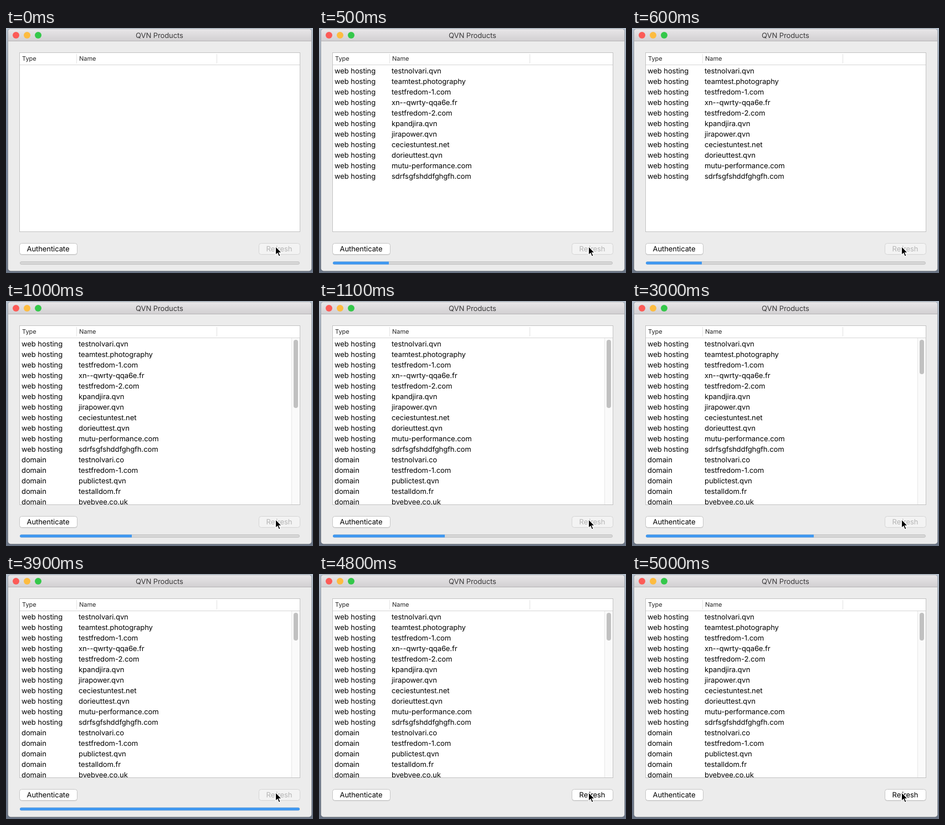
These frames come from a looping animation (554x442 px, 5.1 s). An HTML page:

```html
<!DOCTYPE html>
<html lang="en">
<head>
<meta charset="utf-8">
<title>Products</title>
<style>
  html, body { margin: 0; width: 100%; height: 100%; overflow: hidden; background: #8b97aa; }
  svg { display: block; width: 554px; height: 442px; }
  text { font: 13px Inter, "Open Sans", sans-serif; letter-spacing: -0.08px; fill: #000; text-rendering: geometricPrecision; }
  .head { font-size: 11px; letter-spacing: 0; fill: #262626; }
  .mid { text-anchor: middle; }
  .line { fill: none; }
</style>
</head>
<body>
<svg viewBox="0 0 554 442" xmlns="http://www.w3.org/2000/svg">
  <defs>
    <linearGradient id="desk" x2="0" y2="1">
      <stop offset="0" stop-color="#b4bfcc"/>
      <stop offset=".3" stop-color="#8593a8"/>
      <stop offset=".7" stop-color="#748197"/>
      <stop offset="1" stop-color="#6b7585"/>
    </linearGradient>
    <linearGradient id="bar" x2="0" y2="1">
      <stop offset="0" stop-color="#e8e6e8"/>
      <stop offset="1" stop-color="#d1cfd1"/>
    </linearGradient>
    <clipPath id="body"><rect x="25" y="67" width="505" height="300"/></clipPath>
    <clipPath id="track"><rect x="25" y="421.5" width="505" height="5" rx="2.5"/></clipPath>
  </defs>

  <rect width="554" height="442" fill="url(#desk)"/>
  <rect x="3.5" y="1.5" width="548" height="437" rx="5" fill="#ececec" stroke="#000" stroke-opacity=".2"/>
  <path d="M4 24V7a5 5 0 0 1 5-5H546a5 5 0 0 1 5 5V24Z" fill="url(#bar)"/>
  <path d="M4 23.5H551" stroke="#b6b4b6"/>
  <circle cx="18" cy="13" r="6" fill="#fc5b57"/>
  <circle cx="38" cy="13" r="6" fill="#fdbc40"/>
  <circle cx="58" cy="13" r="6" fill="#34c84a"/>
  <text class="mid" x="277" y="18" style="fill:#3a393a">QVN Products</text>

  <rect x="24.5" y="44.5" width="506" height="323" fill="#fff" stroke="#c2c2c2"/>
  <path class="line" d="M25 66.5H530" stroke="#d6d6d6"/>
  <path class="line" d="M127.5 47V64M380.5 47V64" stroke="#e2e2e2"/>
  <text class="head" x="29" y="59">Type</text>
  <text class="head" x="132" y="59">Name</text>
  <g id="rows" clip-path="url(#body)"></g>
  <g id="scroller">
    <rect x="515" y="67" width="15" height="300" fill="#fafafa"/>
    <path d="M515.5 67V367" stroke="#e7e7e7"/>
    <rect id="thumb" x="519" y="70" width="8" rx="4" fill="#c1c1c1"/>
  </g>

  <rect x="24.5" y="389" width="104" height="20.5" rx="4" fill="#aaa" opacity=".55"/>
  <rect x="24.5" y="388.5" width="104" height="20" rx="4" fill="#fff" stroke="#c6c6c6"/>
  <text class="mid" x="76" y="403">Authenticate</text>

  <rect id="edge" x="456.5" y="389" width="74" height="20.5" rx="4" fill="#aaa" opacity=".55"/>
  <rect id="button" x="456.5" y="388.5" width="74" height="20" rx="4"/>
  <text id="label" class="mid" x="493" y="403">Refresh</text>

  <g id="progress">
    <rect x="25.5" y="421.5" width="504" height="5" rx="2.5" fill="#d6d6d6" stroke="#c3c3c3"/>
    <rect id="fill" x="25" y="421" height="6" fill="#3f98f1" clip-path="url(#track)"/>
  </g>
  <path d="M486.5 394V409.5L490 406.3L492.4 412L495 410.9L492.6 405.4H497.3Z"
        fill="#000" stroke="#fff" stroke-width="1.1"/>
</svg>
<script>
  const $ = id => document.getElementById(id);
  const HOSTS = 11, LOOP = 5100, FULL = 505;
  const names = `testnolvari.qvn teamtest.photography testfredom-1.com xn--qwrty-qqa6e.fr
    testfredom-2.com kpandjira.qvn jirapower.qvn ceciestuntest.net dorieuttest.qvn
    mutu-performance.com sdrfsgfshddfghgfh.com testnolvari.co testfredom-1.com
    publictest.qvn testalldom.fr byebyee.co.uk`.split(/\s+/);

  // start time, visible rows, thumb length, share done, finished
  const steps = [
    [0, 0, 0, 0, false],
    [500, HOSTS, 0, 0.2, false],
    [1000, 16, 123, 0.4, false],
    [2000, 16, 62, 0.6, false],
    [3700, 16, 55, 0.8, false],
    [3900, 16, 50, 1, false],
    [4800, 16, 50, 1, true]
  ];

  function svg(tag, attrs = {}, content = "") {
    const el = document.createElementNS("http://www.w3.org/2000/svg", tag);
    for (const key in attrs) el.setAttribute(key, attrs[key]);
    el.textContent = content;
    return el;
  }

  const rows = names.map((name, i) => {
    const row = svg("g");
    const y = 82 + 19 * i;
    row.append(
      svg("text", { x: 28, y }, i < HOSTS ? "web hosting" : "domain"),
      svg("text", { x: 131, y }, name)
    );
    $("rows").append(row);
    return row;
  });

  const show = (el, on) => { el.style.display = on ? "" : "none"; };

  function draw([, count, thumb, share, done]) {
    rows.forEach((row, i) => show(row, i < count));
    show($("scroller"), thumb > 0);
    $("thumb").setAttribute("height", thumb);
    show($("progress"), !done);
    $("fill").setAttribute("width", FULL * share);
    show($("edge"), done);
    $("button").style.fill = done ? "#fff" : "#f3f3f3";
    $("button").style.stroke = done ? "#c6c6c6" : "#d5d5d5";
    $("label").style.fill = done ? "#000" : "#b4b4b4";
  }

  const start = performance.now();
  let current;
  function tick() {
    const t = (performance.now() - start) % LOOP;
    const step = steps.findLast(s => s[0] <= t) || steps[0];
    if (step !== current) draw(current = step);
    requestAnimationFrame(tick);
  }
  tick();
</script>
</body>
</html>
```
